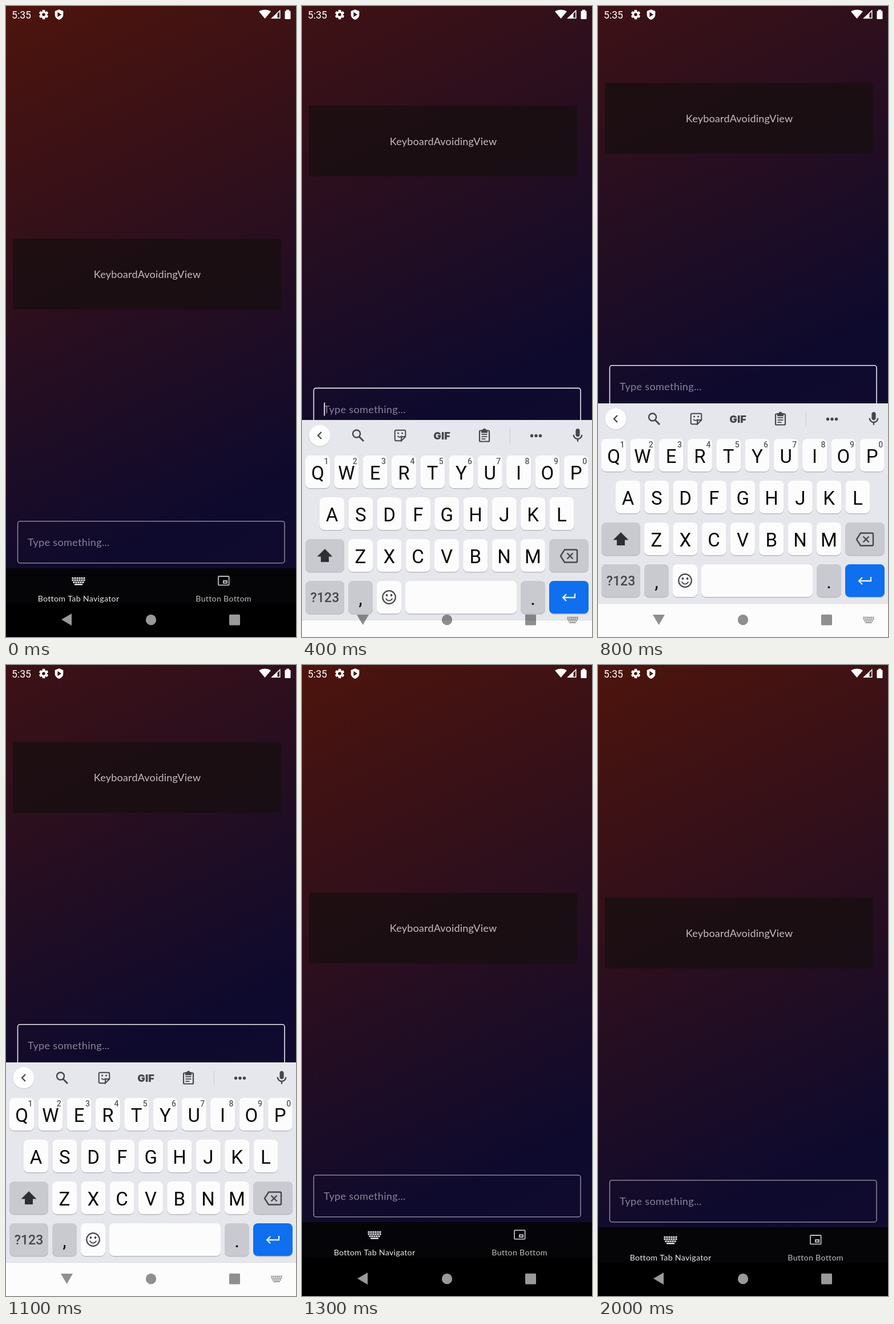
These frames come from a looping animation (508x1102 px, 2.1 s). An HTML page with a canvas:

```html
<!DOCTYPE html>
<html lang="en">
<head>
<meta charset="utf-8">
<title>Keyboard avoiding view</title>
<style>
html, body { margin: 0; width: 100%; height: 100%; overflow: hidden; background: #000; }
canvas { display: block; }
</style>
</head>
<body>
<canvas id="stage" width="508" height="1102"></canvas>
<script>
const W = 508, H = 1102, LOOP = 2100, STEP = 100;
const KEYBOARD_TOP = 694, KEYBOARD_HEIGHT = H - KEYBOARD_TOP, PAN = 272;
const INK = '#46464a';
const screen = document.getElementById('stage').getContext('2d');
let g = screen;

const clamp = v => Math.max(0, Math.min(1, v));

function rect(x, y, w, h, color, r = 0) {
  g.fillStyle = color;
  g.beginPath();
  g.roundRect(x, y, w, h, r);
  g.fill();
}

function frame(x, y, w, h, color, line, r = 0) {
  g.strokeStyle = color;
  g.lineWidth = line;
  g.beginPath();
  g.roundRect(x, y, w, h, r);
  g.stroke();
}

function disc(x, y, r, color) {
  g.fillStyle = color;
  g.beginPath();
  g.arc(x, y, r, 0, 7);
  g.fill();
}

function ring(x, y, r, color, line, from = 0, to = 2 * Math.PI) {
  g.strokeStyle = color;
  g.lineWidth = line;
  g.beginPath();
  g.arc(x, y, r, from, to);
  g.stroke();
}

// Draws path data around (x, y); a line width strokes it, otherwise it is filled.
function icon(path, x, y, color, line = 0, scale = 1) {
  g.save();
  g.translate(x, y);
  g.scale(scale, scale);
  g.fillStyle = g.strokeStyle = color;
  g.lineWidth = line;
  const shape = new Path2D(path);
  line ? g.stroke(shape) : g.fill(shape, 'evenodd');
  g.restore();
}

function text(str, x, y, font, color, align = 'center', spacing = 0) {
  g.font = font;
  g.fillStyle = color;
  g.textAlign = align;
  g.letterSpacing = spacing + 'px';
  g.fillText(str, x, y);
}

const roboto = (size, weight = 400) => `${weight} ${size}px Roboto, sans-serif`;
const lato = size => `${size}px Lato, sans-serif`;

function keyGrid(x, y, s, color) {
  for (let row = 0; row < 3; row++) {
    const count = row < 2 ? 6 : 5;
    for (let i = 0; i < count; i++)
      rect(x + ((i - count / 2) * 4 + .4) * s, y + (row * 3.7 - 6.5) * s, 3.1 * s, 2.7 * s, color);
  }
  rect(x - 7 * s, y + 4.7 * s, 14 * s, 2.4 * s, color);
}

function statusBar() {
  text('5:35', 10, 21.5, roboto(17.6), '#fff', 'left');
  for (let i = 0; i < 6; i++) {
    g.save();
    g.translate(66, 15);
    g.rotate(i * Math.PI / 3);
    rect(-2.3, -8.2, 4.6, 5, '#fff', .8);
    g.restore();
  }
  ring(66, 15, 4.5, '#fff', 3.4);
  icon('M0-9 7.3-6V0C7.3 4.5 4 7.8 0 9-4 7.8-7.3 4.5-7.3 0V-6ZM-2.6-4.3V4.3L4 0Z', 93, 15, '#fff');
  icon('M0 7.5-10.5-5C-4.5-9 4.5-9 10.5-5Z', 453.5, 14.5, '#fff');
  icon('M-8 7.5 8.5-8V7.5ZM3.5-1V6H7V-4.5Z', 472, 14.5, '#fff');
  rect(488.5, 8.5, 10, 14.5, '#fff', 1.3);
  rect(491, 6.5, 5, 3, '#fff');
}

function app(pan, focused, cursor) {
  rect(0, 0, W, H, '#000');
  g.save();
  g.translate(0, -pan);

  const sky = g.createLinearGradient(0, 0, W, H);
  sky.addColorStop(0, 'rgb(78,20,12)');
  sky.addColorStop(.8, 'rgb(13,10,46)');
  sky.addColorStop(1, 'rgb(20,12,46)');
  rect(0, 0, W, 982, sky);

  rect(12, 406.5, 469.5, 123.5, 'rgba(22,14,14,.72)');
  text('KeyboardAvoidingView', 247.5, 475, lato(18), '#c3bcbd', 'center', .2);

  frame(20.5, 899.8, 467.5, 73, focused ? '#ececf0' : '#a19ca9', focused ? 1.6 : 1.3, 4);
  text('Type something...', 38, 943, lato(18), '#8a8296', 'left', .35);
  if (cursor) rect(38.3, 925, 2, 23, '#dcd9e0');

  rect(0, 982, W, 61, '#050406');
  keyGrid(127, 1004.3, 1, '#e8e8e8');
  text('Bottom Tab Navigator', 127, 1039.5, lato(14.2), '#e8e8e8', 'center', .3);
  frame(372, 996, 18.6, 15.4, '#bdbdbd', 1.8, 1);
  frame(381, 1004, 6, 3.8, '#bdbdbd', 2);
  text('Button Bottom', 381, 1039.5, lato(14.2), '#bdbdbd', 'center', .3);
  g.restore();
}

function key(x, y, w, label, color = '#fcfcfd') {
  rect(x, y + 1.4, w, 57, '#b9bac0', 8);
  rect(x, y, w, 57, color, 8);
  if (label) text(label, x + w / 2, y + 41.5, roboto(33), '#080808');
}

function toolbar(expanded) {
  disc(31, 722, 19, '#d2d3d8');
  disc(31, 721, 18.5, '#fdfdfd');
  icon(expanded ? 'M3-6-3 0 3 6' : 'M-3-6 3 0-3 6', 31, 721, INK, 2.3);
  icon('M12 14c1.7 0 3-1.3 3-3V5c0-1.7-1.3-3-3-3S9 3.300 9 5v6c0 1.700 1.300 3 3 3zm5-3c0 2.800-2.200 5-5 5s-5-2.200-5-5H5c0 3.500 2.600 6.400 6 6.900V21h2v-3.100c3.400-.5 6-3.400 6-6.900z',
    468.600, 706.500, INK, 0, 1.2);
  if (!expanded) return;

  ring(95.500, 718, 6.500, INK, 2.4);
  icon('M0 0 8 8', 100, 723, INK, 2.8);

  icon('M2 9.300H-7Q-9.300 9.300-9.300 7V-7Q-9.300-9.300-7-9.300H7Q9.300-9.300 9.300-7V2L2 9.300V5Q2 2 5 2H9', 172, 721, INK, 2);
  disc(168.500, 717, 1.5, INK);
  disc(175.500, 717, 1.5, INK);
  ring(171, 719.500, 4.3, INK, 1.8, .5, 2.600);

  text('GIF', 245, 727.500, '900 18px Inter, sans-serif', INK);

  frame(311, 712.500, 17, 19, INK, 2.2, 1.5);
  rect(314, 711, 11, 5.500, INK);
  disc(319.500, 711.500, 2.800, INK);
  [[719, 10], [723, 10], [727, 7]].forEach(([y, w]) => rect(314.500, y - .8, w, 1.8, INK));

  rect(364, 708, 1, 26, '#cfd0d5');
  for (const x of [402.500, 410, 417.500]) disc(x, 721.500, 2.700, INK);
}

function buildKeyboard(expanded) {
  const canvas = document.createElement('canvas');
  canvas.width = W;
  canvas.height = KEYBOARD_HEIGHT;
  g = canvas.getContext('2d');
  g.translate(0, -KEYBOARD_TOP);
  rect(0, KEYBOARD_TOP, W, KEYBOARD_HEIGHT, '#e6e7ec');
  toolbar(expanded);

  const pitch = 50.3, grey = '#c9cacf';
  const row = (letters, x, y) => [...letters].forEach((c, i) => key(x + i * pitch, y, 43, c));
  row('QWERTYUIOP', 6, 756);
  [...'1234567890'].forEach((c, i) => text(c, 42.500 + i * pitch, 771, roboto(14, 500), '#58595d'));
  row('ASDFGHJKL', 31, 829);
  row('ZXCVBNM', 81, 902);

  key(6, 902, 68, '', grey);
  icon('M0-12 13.500 1.500H7V11H-7V1.500H-13.500Z', 40, 931, '#2f2f32');
  key(433, 902, 69, '', grey);
  icon('M-14 0-7-11H13Q15-11 15-9V9Q15 11 13 11H-7ZM-2.500-5 7.500 5M7.500-5-2.500 5', 467, 931.500, INK, 2.4);

  key(6, 975, 68, '', grey);
  text('?123', 40, 1012, roboto(23, 500), INK);
  key(81, 975, 43, ',', grey);
  key(131, 975, 43);
  ring(152.500, 1003.500, 11.300, INK, 2.2);
  disc(148.500, 1000, 1.9, INK);
  disc(156.500, 1000, 1.9, INK);
  ring(152.500, 1003.500, 6, INK, 2, .35, 2.8);
  key(181, 975, 195);
  key(383, 975, 43, '.', grey);
  key(433, 975, 69, '', '#0f6fee');
  icon('M11-7V0H-10M-4-6-10 0-4 6', 467, 1004, '#e8f0fd', 2.3);

  rect(0, 1043.500, W, 59, '#fcfcfc');
  rect(0, 1043, W, 1, '#dddee2');
  g = screen;
  return canvas;
}

function navBar(color, turn, picker) {
  g.save();
  g.translate(106.500, 1071.500);
  g.rotate(-turn * Math.PI / 2);
  icon('M-9.500 0 8.500-10.500V10.500Z', 0, 0, color);
  g.restore();
  disc(254, 1072, 9.2, color);
  rect(391, 1062.800, 19, 18.700, color, 1.5);
  if (picker) keyGrid(474, 1072, .82, color);
}

const expandedKeys = buildKeyboard(true);
const collapsedKeys = buildKeyboard(false);

function draw(ms) {
  const remaining = (start, length) => (1 - clamp((ms - start) / length)) ** 5;
  const opening = ms < 1200;
  const leave = clamp((ms - 1175) / 100);
  const pan = PAN * (opening ? 1 - remaining(320, 250) : remaining(1176, 250));
  const drop = KEYBOARD_HEIGHT * (opening ? remaining(283, 285) : leave ** 2.2);
  const alpha = opening ? clamp((ms - 283) / 90) : 1 - leave;

  app(pan, ms >= 200 && opening, ms >= 200 && ms < 700);
  g.globalAlpha = alpha;
  g.drawImage(opening ? expandedKeys : collapsedKeys, 0, KEYBOARD_TOP + drop);
  g.globalAlpha = 1;
  statusBar();

  const onWhite = alpha > .5;
  const navColor = !onWhite ? 'rgba(255,255,255,.6)' : `rgba(0,0,0,${opening ? .43 : .05})`;
  const turn = onWhite ? (opening ? 1 : .5) : 0;
  navBar(navColor, turn, opening && alpha > 0);
}

function tick() {
  draw(Math.floor(performance.now() % LOOP / STEP) * STEP);
  requestAnimationFrame(tick);
}
tick();
</script>
</body>
</html>
```
